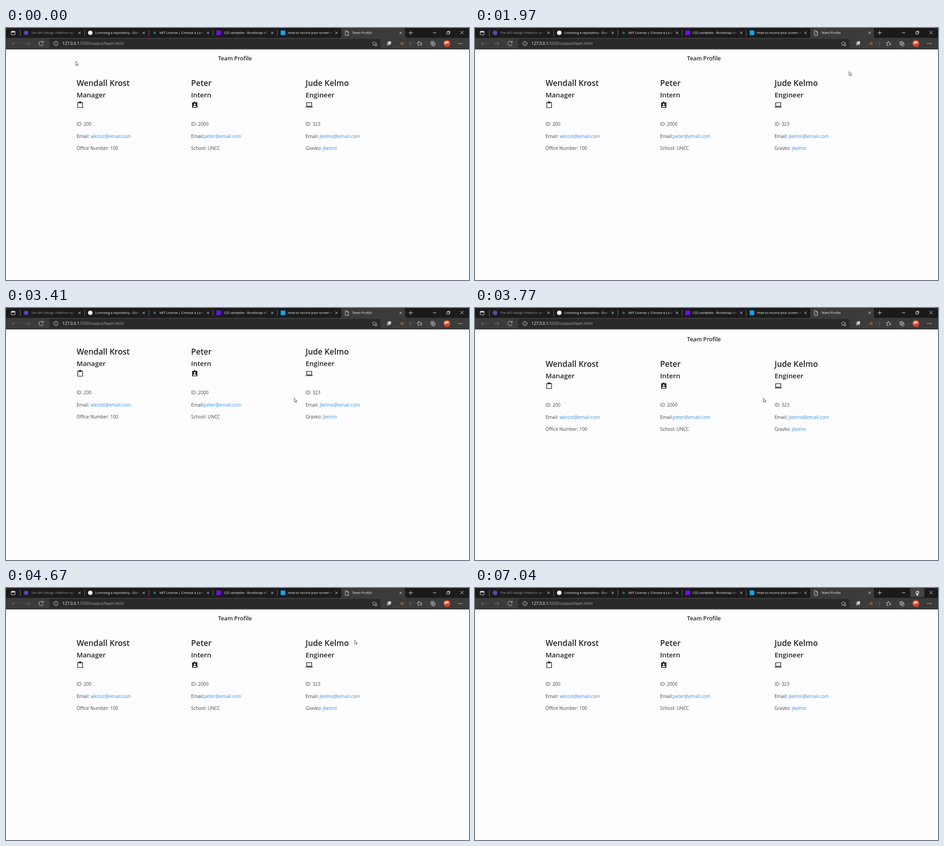
Animation, 1015 px wide and 552 px high, one loop 7520 ms. Source, as an HTML page:

```html
<!DOCTYPE html>
<html lang="en">
<head>
<meta charset="utf-8">
<title>Team Profile</title>
<style>
  html, body { margin: 0; width: 100%; height: 100%; overflow: hidden; background: #fdfdff; }
  svg { display: block; width: 1015px; height: 552px; font-family: "Open Sans", "Noto Sans", sans-serif; }
  .line { fill: none; stroke: #ddd; stroke-width: 1; }
  .dim { stroke: #777; }
  .tab { font-size: 7.4px; fill: #f2f2f2; }
  .url { font-size: 8.67px; fill: #aaa; }
  .page { fill: #212529; font-weight: 600; }
  .page .row { font-size: 10px; font-weight: 400; fill: #454545; }
  .page .link { fill: #3290e0; }
  .icon { fill: none; stroke: #212529; stroke-width: 1.4; }
</style>
</head>
<body>
<svg viewBox="0 0 1015 552">
  <defs>
    <linearGradient id="fade">
      <stop offset="0" stop-color="#1b1b1b" stop-opacity="0"/>
      <stop offset="1" stop-color="#1b1b1b"/>
    </linearGradient>
  </defs>
  <rect width="1015" height="552" fill="#fdfdff"/>

  <g id="page" class="page">
    <text x="502" y="70.700" font-size="12.300" text-anchor="middle">Team Profile</text>
    <g id="cards"></g>
    <g class="icon">
      <path d="M157.200 163.200h10.600v11.200h-10.600z"/>
      <path d="M159.500 162h6v3h-6z" fill="#212529" stroke="none"/>
      <circle cx="162.500" cy="162" r="1"/>
    </g>
    <path d="M408 163h3.500a2 2 0 0 1 4 0h4v11.600h-11.500z"/>
    <circle cx="413.700" cy="167.200" r="1.900" fill="#fdfdff"/>
    <path d="M410 173q0-3 3.700-3t3.700 3z" fill="#fdfdff"/>
    <path class="icon" d="M659.200 163.600h11v7.800h-11zM657 173.200h15.400"/>
  </g>

  <g id="chrome">
    <rect width="1015" height="22" fill="#1b1b1b"/>
    <path d="M0 21.500H732q3 0 3-3V3q0-3 3-3H872q3 0 3 3V18.500q0 3 3 3H1015V47H0z" fill="#3b3b3b"/>
    <rect x="95" y="24" width="726" height="20" rx="3" fill="#292929"/>
    <g id="tabs"></g>
    <rect id="hover" x="954" width="31" height="20" fill="#444"/>
    <g class="line">
      <rect x="11.500" y="7" width="8.500" height="8" rx="1"/>
      <path d="M11.500 8.500h8.500" stroke-width="2.500"/>
      <path d="M744 6h4l3 3v7h-7zM748 6v3h3"/>
      <path d="M883 10.500h8.500M887.200 6v9M936 10.500h7M966.500 8.500h5v5h-5zM968 8.500V7h5v5h-1.500M996 6.500l7 7m0-7l-7 7"/>
      <path class="dim" d="M23.500 34h-10m4-4l-4 4 4 4M42.500 34h10m-4-4l4 4-4 4"/>
      <path d="M81 31.300a4.800 4.800 0 1 0 .5 3.700M81.500 28.500v3.500h-3.500"/>
      <circle cx="109.500" cy="34" r="4.800"/>
      <path d="M109.500 33v3.500M109.500 31v1"/>
      <path d="M807.500 29l1.500 3.200 3.500.4-2.600 2.400.7 3.500-3.100-1.700-3.100 1.700.7-3.500-2.600-2.400 3.500-.4z" stroke="#aaa"/>
      <circle cx="810.700" cy="37" r="2.600" fill="#292929" stroke="#aaa"/>
      <path d="M809.200 37h3m-1.500-1.500v3" stroke="#aaa" stroke-width=".7"/>
      <path d="M835 31h6v7h-6z" fill="#888" stroke="none"/>
      <path d="M838 29h6v7h-6z" fill="#ccc" stroke="none"/>
      <path class="dim" d="M887 29v10"/>
      <path d="M908 32.500l-2-3.500-1.500 3.200-3.200.4 2.400 2.400-.6 3.500 3-1.700M908 32.800h4M908 35.300h4M908 37.800h3"/>
      <rect x="931.500" y="29.500" width="6.500" height="6.500" rx="1"/>
      <path d="M934 36v2q0 1 1 1h4.500q1 0 1-1v-4.500q0-1-1-1H938M934.700 31v3.500m-1.700-1.700h3.500"/>
    </g>
    <circle cx="868.500" cy="34" r="3.600" fill="#8f5528"/>
    <circle cx="966.500" cy="34" r="7.500" fill="#d8452c"/>
    <path d="M960 31q7-5 12 0l-3 3-7 1z" fill="#efb29a"/>
    <g fill="#ddd"><circle cx="992.500" cy="34" r=".9"/><circle cx="996.300" cy="34" r=".9"/><circle cx="1000" cy="34" r=".9"/></g>
    <text class="url" x="124" y="37"><tspan fill="#fff">127.0.0.1</tspan>:5500/output/team.html</text>
  </g>

  <path id="cursor" d="M0 0V8.800L2 7l1.500 3 1.400-.7L3.500 6.500H6z" fill="#fff" stroke="#333" stroke-width=".8"/>
</svg>
<script>
const $ = id => document.getElementById(id);

const cards = [
  ["Wendall Krost", "Manager", "ID: 200", "Email: ", "wkrost@email.com", "Office Number: 100", ""],
  ["Peter", "Intern", "ID: 2000", "Email:", "peter@email.com", "School: UNCC", ""],
  ["Jude Kelmo", "Engineer", "ID: 323", "Email: ", "jkelmo@email.com", "Gravko: ", "jkelmo"]
];
const row = (x, y, label, link = "") =>
  `<text class="row" xml:space="preserve" x="${x}" y="${y}">${label}<tspan class="link">${link}</tspan></text>`;
$("cards").innerHTML = cards.map(([name, role, id, mail, address, extra, user], i) => {
  const x = 154.7 + 251 * i;
  return `<text x="${x}" y="127" font-size="17.4">${name}</text>
    <text x="${x}" y="152" font-size="14.9">${role}</text>` +
    row(x, 214, id) + row(x, 240.5, mail, address) + row(x, 267, extra, user);
}).join("");

const tabs = [
  ["The API Design Platform and", "#5b45b8", "circle"],
  ["Licensing a repository - Gravko", "#ffffff", "circle"],
  ["MIT License | Choose a License", "#15717d", "small"],
  ["CSS variables · Bootstrap v5.0", "#6f10f2", "square"],
  ["How to record your screen in", "#12a5ee", "square"],
  ["Team Profile", "", ""]
];
const favicon = (shape, x, color) => {
  if (shape === "circle") return `<circle cx="${x}" cy="10.5" r="5" fill="${color}"/>`;
  const size = shape === "small" ? 5 : 10;
  return shape && `<rect x="${x - size / 2}" y="${10.5 - size / 2}" width="${size}" height="${size}" fill="${color}"/>`;
};
$("tabs").innerHTML = tabs.map(([label, color, shape], i) => {
  const x = 31.2 + 140.8 * i, active = i === 5;
  const cover = active ? "" :
    `<rect x="${x + 110}" y="3" width="12" height="15" fill="url(#fade)"/>
     <rect x="${x + 121.5}" y="3" width="18" height="15" fill="#1b1b1b"/>
     <path class="line dim" d="M${x + .3} 4v14"/>`;
  return `<text class="tab" x="${x + 23.8}" y="13.3"${i ? "" : ' style="fill:#999"'}>${label}</text>` +
    cover + favicon(shape, x + 12.8, color) +
    `<path class="line" d="M${x + 127.3} 8l5.400 5.400m0-5.400l-5.400 5.400"/>`;
}).join("");

// Keys: time, then values; linear between keys, held at both ends.
const pointer = [
  [70, 153, 73], [450, 170, 250], [800, 450, 284], [840, 450, 284], [1070, 700, 297],
  [1500, 700, 297], [1970, 820, 95], [2210, 815, 95], [2540, 815, 95], [2710, 632, 197],
  [4470, 632, 197], [4670, 764, 114], [5040, 903, 55], [5180, 903, 55], [5740, 967.5, 9]
];
const scroll = [
  [2940, 0], [3040, -25], [3500, -25], [3670, 0], [3710, 0],
  [3770, 2], [3950, 10], [4150, 4], [4440, 0]
];
function sample(keys, t) {
  const next = keys.findIndex(key => key[0] > t);
  if (next === 0) return keys[0].slice(1);
  if (next < 0) return keys[keys.length - 1].slice(1);
  const a = keys[next - 1], b = keys[next];
  const p = (t - a[0]) / (b[0] - a[0]);
  return a.slice(1).map((v, i) => v + (b[i + 1] - v) * p);
}

const start = performance.now();
function draw() {
  const t = (performance.now() - start) % 7520;
  const [x, y] = sample(pointer, t);
  const [offset] = sample(scroll, t);
  $("page").setAttribute("transform", `translate(0 ${Math.round(offset)})`);
  $("cursor").setAttribute("transform", `translate(${x} ${y})`);
  $("hover").setAttribute("visibility", x > 954 && y < 20 ? "visible" : "hidden");
  requestAnimationFrame(draw);
}
draw();
</script>
</body>
</html>
```
